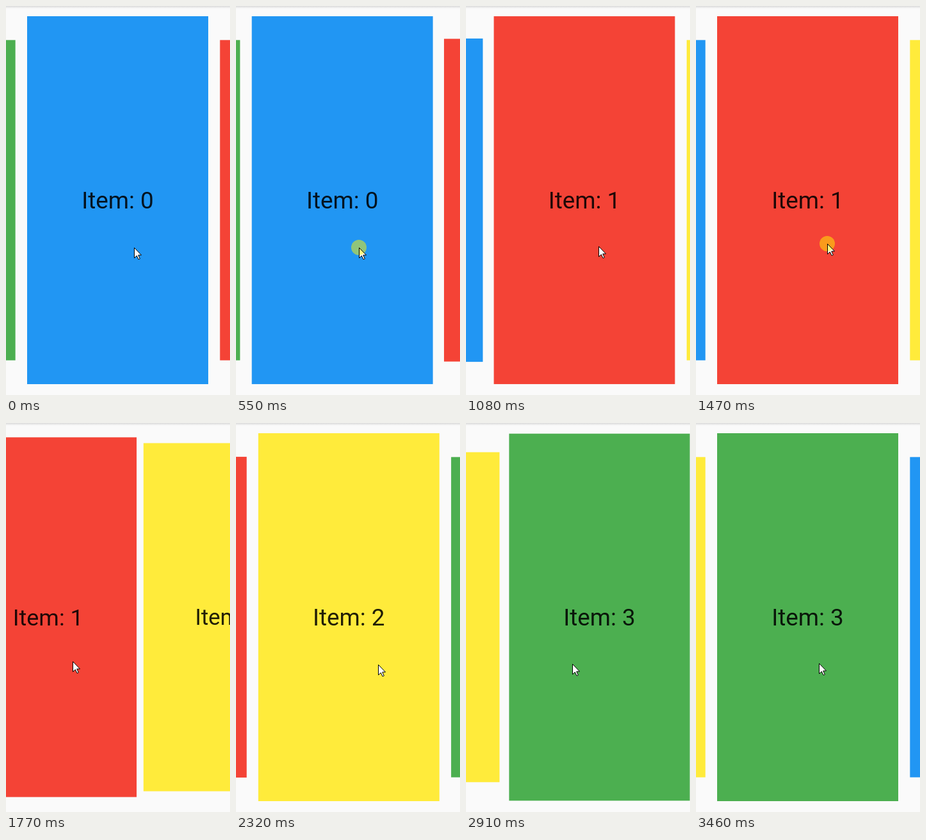
Animation of 350x609 px, one loop 3.91 s. Source, as an HTML page:

```html
<!DOCTYPE html>
<html lang="en">
<head>
<meta charset="utf-8">
<title>Card carousel</title>
<style>
  html, body { margin: 0; width: 100%; height: 100%; overflow: hidden; background: #fafafa; }
  svg { display: block; width: 350px; height: 609px; }
  text { font: 36.8px Roboto, sans-serif; text-anchor: middle; fill: rgba(0, 0, 0, .87); }
</style>
</head>
<body>
<svg viewBox="0 0 350 609">
  <defs>
    <linearGradient id="shade" x2="0" y2="1">
      <stop offset="0" stop-color="#d9d9d9"/>
      <stop offset="1" stop-color="#fafafa"/>
    </linearGradient>
    <path id="arrow" d="M.5 .5V16.5L4.3 13L7 18.7L9.3 17.7L6.7 12H11.5Z"/>
  </defs>
  <rect width="350" height="4" fill="url(#shade)"/>
  <g id="cards"></g>
  <g id="pointer">
    <use href="#arrow" fill="#fff"/>
    <circle id="touch" r="12" fill="#fff302" fill-opacity=".5"/>
    <use href="#arrow" fill="none" stroke="#000"/>
  </g>
</svg>
<script>
const LOOP = 3910, START = 470, STEP = 2990 / 39, LAST_STEP = 39;
const PITCH = 283, HEIGHT = 576, CENTER_X = 174.5, CENTER_Y = 304;
const COLORS = ['#2196f3', '#f44336', '#ffeb3b', '#4caf50'];

const swipes = [
  { press: 470, release: 724.5, from: [200, 378], to: [108, 374] },
  { press: 1466, release: 1763, from: [205, 372], to: [104, 373] },
  { press: 2385, release: 2703, from: [220, 378], to: [118, 378] }
];
const smooth = u => u * u * (3 - 2 * u);
const accelerate = u => u * u;
const drag = s => ({ start: s.press, end: s.release, to: s.to, ease: accelerate });
const glide = (start, end, to) => ({ start, end, to, ease: smooth });
const moves = [
  drag(swipes[0]), glide(724.5, 1050, [207, 376]), glide(1050, 1400, [205, 372]),
  drag(swipes[1]), glide(1763, 2250, [222, 378]), glide(2310, 2385, [220, 378]),
  drag(swipes[2]), glide(2703, 3070, [192, 376])
];

const clamp01 = v => Math.min(1, Math.max(0, v));

function pointerAt(t) {
  let pos = swipes[0].from;
  for (const m of moves) {
    if (t < m.start) break;
    const p = m.ease(clamp01((t - m.start) / (m.end - m.start)));
    pos = pos.map((v, i) => v + (m.to[i] - v) * p);
  }
  return pos;
}

// Overdamped spring that pulls a released page into place.
function remaining(distance, seconds) {
  const slow = 9.07, fast = 22, speed = 2.42;
  const a = (fast * distance - speed) / (fast - slow);
  const rest = a * Math.exp(-slow * seconds) + (distance - a) * Math.exp(-fast * seconds);
  return rest < .001 ? 0 : rest;
}

function pageAt(t) {
  const n = swipes.findLastIndex(s => t >= s.press);
  if (n < 0) return 0;
  const s = swipes[n];
  const dragged = (s.from[0] - s.to[0]) / PITCH;
  if (t < s.release) return n + dragged * accelerate((t - s.press) / (s.release - s.press));
  return n + 1 - remaining(1 - dragged, (t - s.release) / 1000);
}

// cubic-bezier(0, 0, .58, 1), solved with Newton steps
function easeOut(x) {
  let u = x;
  for (let i = 0; i < 8; i++) u -= (1.74 * u * u - .74 * u ** 3 - x) / (3.48 * u - 2.22 * u * u);
  return smooth(u);
}

const cardLayer = document.getElementById('cards');
const pointer = document.getElementById('pointer');
const touch = document.getElementById('touch');

const cards = [-1, 0, 1, 2, 3, 4].map(index => {
  const item = (index + 4) % 4;
  const node = document.createElementNS('http://www.w3.org/2000/svg', 'g');
  node.innerHTML = `<rect x="${-PITCH / 2}" y="${-HEIGHT / 2}" width="${PITCH}" height="${HEIGHT}"
    fill="${COLORS[item]}"/><text y="13">Item: ${item}</text>`;
  cardLayer.append(node);
  return { index, node };
});

function draw(t) {
  const page = pageAt(t);
  for (const { index, node } of cards) {
    const offset = index - page;
    const scale = easeOut(1 - .3 * Math.min(1, Math.abs(offset)));
    node.setAttribute('transform', `translate(${CENTER_X + offset * PITCH} ${CENTER_Y}) scale(${scale})`);
    node.style.display = Math.abs(offset) < 1.5 ? '' : 'none';
  }
  const [x, y] = pointerAt(t).map(Math.round);
  pointer.setAttribute('transform', `translate(${x} ${y})`);
  touch.style.display = swipes.some(s => t >= s.press && t < s.release) ? '' : 'none';
}

function tick() {
  const t = performance.now() % LOOP;
  const step = Math.min(LAST_STEP, Math.floor((t - START) / STEP + .2));
  draw(t < START ? 0 : START + step * STEP);
  requestAnimationFrame(tick);
}
tick();
</script>
</body>
</html>
```
